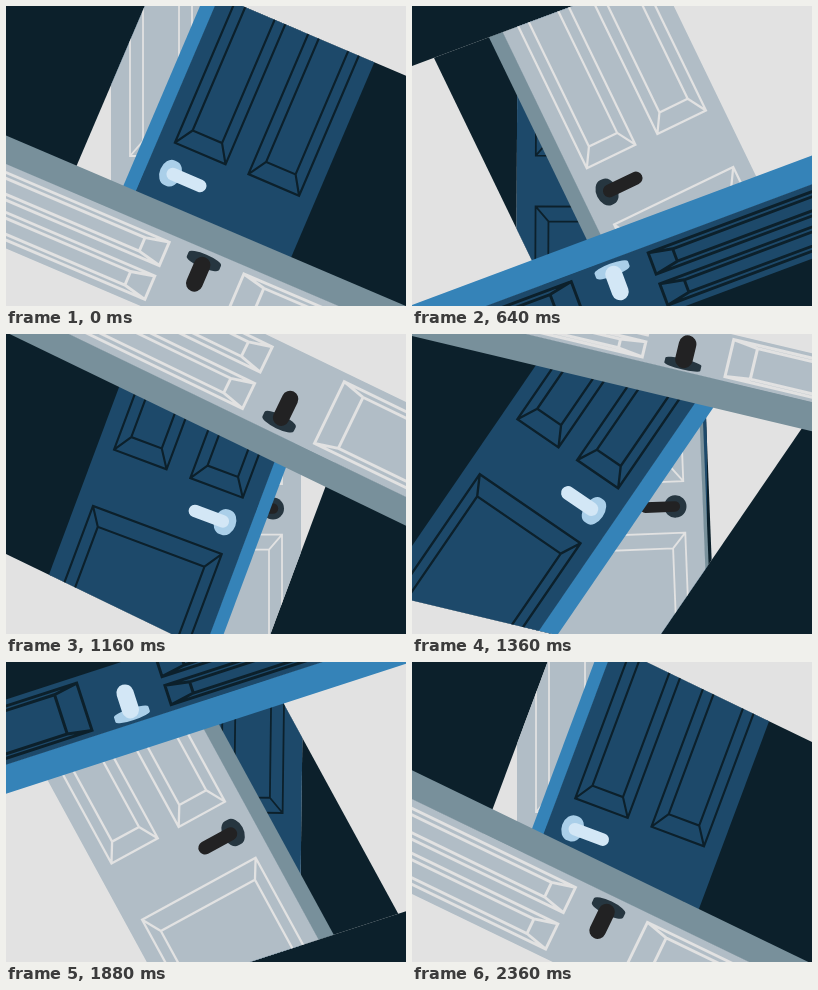
These frames come from a looping animation (400 px wide and 300 px high, 2400 ms). An HTML page with a canvas:

```html
<!DOCTYPE html>
<html lang="en">
<head>
<meta charset="utf-8">
<title>Endless doors</title>
<style>
html, body { margin: 0; width: 100%; height: 100%; overflow: hidden; background: #0c202b; }
canvas { display: block; width: 400px; height: 300px; }
</style>
</head>
<body>
<canvas id="stage" width="400" height="300"></canvas>
<script>
const ctx = document.getElementById('stage').getContext('2d');
const LOOP = 2400, GAP = 600, LIFE = 1800, STEP = 40;
const FAR = 600, WIDTH = 190;

const GREY = { wall: '#e2e2e2', face: '#b1bdc6', edge: '#78909b', line: '#e2e2e2',
               plate: '#263640', lever: '#222223', turn: -1 };
const BLUE = { wall: '#0c202b', face: '#1d496a', edge: '#3583b8', line: '#0c202b',
               plate: '#aacfe9', lever: '#d3e7f6', turn: 1 };
const FREE_SIDE = [1, -1, -1, 1];

// Pose of one door; x runs from the free edge (negative) to the hinge.
function pose(index, age) {
  const u = Math.min(1, Math.max(0, age / LIFE));
  const e = (1 - Math.cos(Math.PI * u)) / 2;
  const half = 95 + 83 * e - 9 * e * e;
  const scale = half / 95;
  const depth = Math.sqrt(1 - (1 - e) * (1 - e));
  const outer = half * (2 * e * (0.86 + 0.09 * e) - 1);
  const inner = outer + 17 * scale * depth;
  const hinge = half * (1 + 0.1 * e);
  const look = index % 2 ? BLUE : GREY;
  return {
    look, half, scale, depth, outer, inner, hinge,
    squash: Math.max(0, hinge - inner) / WIDTH,
    angle: look.turn * (0.92 * e + 0.08 * u) * Math.PI / 2,
    flip: FREE_SIDE[index % 4]
  };
}

function enter(d) {
  ctx.translate(200, 150);
  ctx.rotate(d.angle);
  ctx.scale(d.flip, 1);
}

function path(points) {
  points.forEach(([x, y], i) => i ? ctx.lineTo(x, y) : ctx.moveTo(x, y));
}

// Bevelled panel: two nested frames joined at the corners.
function panel(d, left, top, right, bottom) {
  const box = (dx, dy) => [
    [left + dx, top + dy], [right - dx, top + dy],
    [right - dx, bottom - dy], [left + dx, bottom - dy]
  ].map(([x, y]) => [d.inner + x * d.squash, y * d.scale]);
  const a = box(0, 0), b = box(13, 15);
  ctx.beginPath();
  for (const frame of [a, b]) { path(frame); ctx.closePath(); }
  a.forEach((p, i) => path([p, b[i]]));
  ctx.stroke();
}

function handle(d) {
  const s = d.scale, x = d.inner + 28 * d.squash, y = 24.5 * s;
  const r = 11 * s, rx = 11 * d.squash, thick = 3 * s * d.depth;
  ctx.fillStyle = d.look.plate;
  ctx.beginPath();
  ctx.ellipse(x - thick / 2, y, rx, r, 0, Math.PI / 2, Math.PI * 1.5);
  ctx.ellipse(x + thick / 2, y, rx, r, 0, -Math.PI / 2, Math.PI / 2);
  ctx.fill();
  ctx.strokeStyle = d.look.lever;
  ctx.lineWidth = 10.5 * s;
  ctx.lineCap = 'round';
  ctx.beginPath();
  path([[x + thick, y], [x + 29 * d.squash + 8 * s * d.depth, y]]);
  ctx.stroke();
}

function drawDoor(d) {
  ctx.save();
  enter(d);
  ctx.fillStyle = d.look.edge;
  ctx.fillRect(d.outer, -FAR, d.inner - d.outer + 0.5, 2 * FAR);
  ctx.fillStyle = d.look.face;
  ctx.fillRect(d.inner, -FAR, Math.max(0, d.hinge - d.inner), 2 * FAR);
  ctx.strokeStyle = d.look.line;
  ctx.lineWidth = 1.8 * d.scale;
  ctx.lineJoin = 'miter';
  ctx.lineCap = 'butt';
  panel(d, 19, -260, 81, 0);
  panel(d, 109, -260, 171, 0);
  panel(d, 19, 50.6, 171, 270);
  handle(d);
  ctx.restore();
}

function clipHole(d) {
  ctx.beginPath();
  const m = ctx.getTransform();
  enter(d);
  ctx.rect(-d.half, -FAR, 2 * d.half, 2 * FAR);
  ctx.setTransform(m);
  ctx.clip();
}

// Each doorway holds the next wall; its door covers what lies inside.
function drawLevel(k, last, time) {
  const d = pose((k + 4) % 4, time - k * GAP);
  ctx.fillStyle = d.look.wall;
  ctx.fillRect(0, 0, 400, 300);
  if (k < last) {
    ctx.save();
    clipHole(d);
    drawLevel(k + 1, last, time);
    ctx.restore();
  }
  drawDoor(d);
}

function frame() {
  const time = Math.floor(performance.now() % LOOP / STEP) * STEP;
  const newest = Math.floor(time / GAP);
  drawLevel(newest - 2, newest + 1, time);
  requestAnimationFrame(frame);
}
frame();
</script>
</body>
</html>
```
